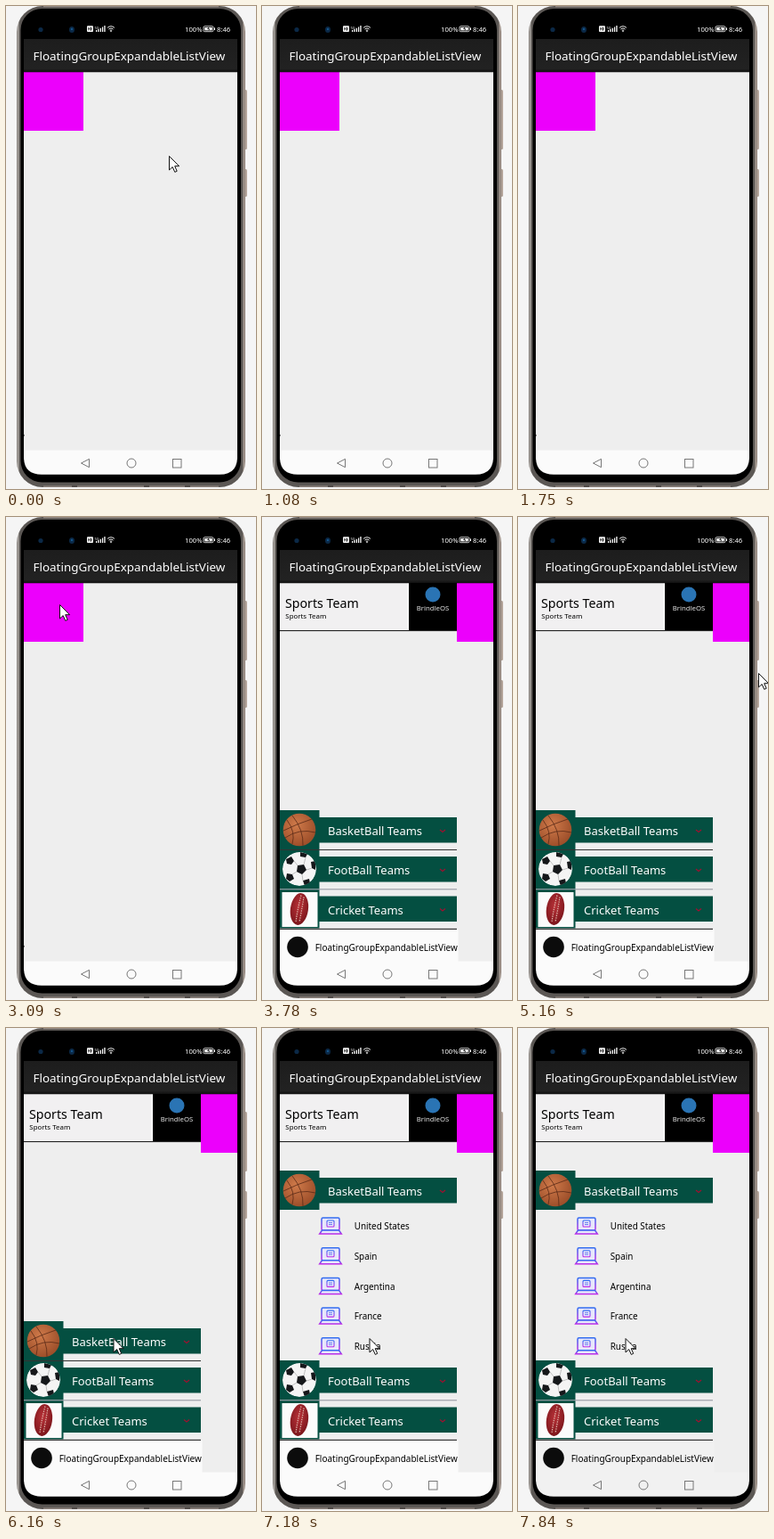
An HTML page that plays this animation: 281 by 542 pixels, repeating every 7990 ms.

```html
<!DOCTYPE html>
<html lang="en">
<head>
<meta charset="utf-8">
<title>Drawer with expandable list</title>
<style>
html, body { margin: 0; width: 100%; height: 100%; overflow: hidden; background: #f5f5f5; }
svg { display: block; width: 281px; height: 542px; font-family: "Noto Sans", "Open Sans", sans-serif; }
</style>
</head>
<body>
<svg viewBox="0 0 281 542">
  <defs>
    <linearGradient id="rim">
      <stop offset="0" stop-color="#7d7874"/><stop offset=".006" stop-color="#aaa5a0"/>
      <stop offset=".014" stop-color="#5b5754"/><stop offset=".986" stop-color="#5b5754"/>
      <stop offset=".994" stop-color="#a89c93"/><stop offset="1" stop-color="#83766e"/>
    </linearGradient>
    <linearGradient id="bar" x2="0" y2="1">
      <stop offset="0" stop-color="#1d1d1d"/><stop offset=".9" stop-color="#222"/><stop offset="1" stop-color="#111"/>
    </linearGradient>
    <linearGradient id="neon" x2="0" y2="1">
      <stop offset="0" stop-color="#2f6cf0"/><stop offset="1" stop-color="#c02be8"/>
    </linearGradient>
    <radialGradient id="orange" cx=".4" cy=".35" r=".7">
      <stop offset="0" stop-color="#cf7a4a"/><stop offset="1" stop-color="#9a4c28"/>
    </radialGradient>
    <radialGradient id="leather" cx=".45" cy=".4" r=".7">
      <stop offset="0" stop-color="#b83238"/><stop offset="1" stop-color="#741218"/>
    </radialGradient>
    <clipPath id="page"><rect x="20" y="74" width="240" height="425"/></clipPath>
    <clipPath id="soccer"><circle r="19"/></clipPath>

    <g id="basketball">
      <circle r="18.3" fill="url(#orange)"/>
      <path d="M-18 1Q-2-7 14-12M-8-16Q5 0 4 18M-16 9Q0-2 18 3M-14-11Q-4 2 -8 16" fill="none" stroke="#5a2a17" stroke-width=".8"/>
    </g>
    <g id="football" clip-path="url(#soccer)">
      <circle r="19" fill="#f4f4f4"/>
      <path d="M-2-4L5-5 8 1 3 6-3 3ZM-15-11L-9-14-6-9-9-5-14-6ZM1-19L9-17 7-13 1-14ZM13-8L18-9V1L14-1ZM-14 5L-8 6-6 11-11 14-15 11ZM4 13L11 11 12 16 6 19Z" fill="#15171a"/>
      <path d="M-2-4L-6-9M5-5L7-13M8 1L14-1M3 6L4 13M-3 3L-8 6" stroke="#aaa" stroke-width=".7"/>
    </g>
    <g id="cricket">
      <rect x="-19.5" y="-18.5" width="40" height="39" fill="#fbfbfb"/>
      <ellipse cy=".5" rx="10" ry="18" fill="url(#leather)" transform="rotate(8)"/>
      <path d="M2-15Q-2 0 -4 15M5-13Q3 0 0 15" fill="none" stroke="#e3c0b4" stroke-width="1.2" stroke-dasharray="1.4 1.2"/>
    </g>
    <g id="laptop" fill="#e8e8fb" stroke="url(#neon)" stroke-width="1.5">
      <rect x="-10" y="-9" width="20" height="14" rx="1.5"/>
      <path d="M-9.5 5H9.5L12.3 9H-12.3Z"/>
      <rect x="-4" y="-6" width="8" height="7" rx="1" stroke-width="1.1"/>
      <path d="M-2-3.5H2M-2-1.5H2" stroke="#4a5ff0" stroke-width=".8"/>
    </g>
  </defs>

  <rect width="281" height="542" fill="#f5f5f5"/>
  <rect x="266" y="94" width="5" height="67" rx="1.5" fill="#b5a69c"/>
  <rect x="266" y="183" width="5" height="31" rx="1.5" fill="#b5a69c"/>
  <rect x="12" y="0" width="257" height="540" rx="29" fill="url(#rim)"/>
  <path d="M42 .6H239M42 539.2H239" stroke="#968b84" stroke-width="1.2"/>
  <path d="M74 539H80M155 539H161M201 539H207" stroke="#514b48" stroke-width="2"/>
  <rect x="16.5" y="3" width="247.5" height="531.5" rx="24" fill="#000"/>

  <g fill="#0b2947">
    <circle cx="39" cy="26.5" r="2.6"/><ellipse cx="74" cy="26.5" rx="3" ry="3.6"/>
    <circle cx="74" cy="26" r="1.2" fill="#14558c"/>
  </g>
  <g fill="#fff">
    <rect x="91" y="22.3" width="7" height="6.6" rx="1"/>
    <path d="M92.6 23.8V27.5M94.2 23.8V27.5M92.6 25.6H94.2M95.5 23.8V27.5Q97.4 25.6 95.5 23.8" fill="none" stroke="#000" stroke-width=".6"/>
    <text x="99.5" y="25.5" font-size="4">5G</text>
    <path d="M101 27H102.2V29H101ZM103.3 26H104.6V29H103.3ZM105.8 24.8H107V29H105.8ZM108 23.4H109.2V29H108ZM110.3 22H111.6V29H110.3Z"/>
    <path d="M114 24.4Q118 21 122 24.4M115.4 26Q118 23.8 120.6 26M116.8 27.5Q118 26.5 119.2 27.5" fill="none" stroke="#fff" stroke-width=".9"/>
    <circle cx="118" cy="28.5" r=".7"/>
    <text x="201" y="28.6" font-size="7.7">100%</text>
    <rect x="222" y="22.7" width="11" height="6" rx="1.3" fill="none" stroke="#fff" stroke-width=".8"/>
    <rect x="223.3" y="24" width="8.4" height="3.4"/>
    <rect x="234" y="24.4" width="1" height="2.6"/>
    <path d="M228 23.5L226 26H228L227.3 28L229.5 25.4H227.7Z" fill="#000"/>
    <text x="237" y="28.6" font-size="7.7">8:46</text>
  </g>

  <rect x="20" y="37" width="240" height="37" fill="url(#bar)"/>
  <text x="30.5" y="61" font-size="13.45" fill="#fff">FloatingGroupExpandableListView</text>
  <rect x="20" y="74" width="240" height="425" fill="#eee"/>
  <path class="pale" d="M20 498.5H260V506Q260 525.7 240 525.7H40Q20 525.7 20 506Z"/>
  <g fill="none" stroke="#777" stroke-width="1">
    <path d="M93.5 508.3V517.7L84.5 513Z"/><circle cx="141" cy="513" r="5"/><rect x="187.5" y="508.5" width="9.5" height="9.5"/>
  </g>

  <g clip-path="url(#page)">
    <g id="slide">
      <rect x="219" y="74" width="67" height="66" fill="#ec00fc"/>
      <rect x="20" y="74" width="199" height="53.5" fill="#f1f0f1"/>
      <rect x="163.5" y="74" width="1.5" height="53" fill="#fff"/>
      <rect x="20" y="127" width="199" height="1.1" fill="#222"/>
      <text x="26" y="101.5" font-size="14.2">Sports Team</text>
      <text x="26.3" y="114" font-size="7.9">Sports Team</text>
      <rect x="165" y="74" width="54" height="53" fill="#000"/>
      <circle cx="192" cy="87" r="8.5" fill="#2a74b4"/>
      <text x="192" y="104.5" font-size="7.8" fill="#e6e6e6" text-anchor="middle">BrindleOS</text>
      <rect class="pale" x="20" y="462" width="200.5" height="37"/>
      <circle cx="40" cy="482.5" r="11.8" fill="#0c0c0c"/>
      <text x="59.7" y="487" font-size="9.97">FloatingGroupExpandableListView</text>
      <g id="rows"></g>
      <g id="kids"></g>
      <rect id="line" x="20" y="373" width="199" height="1" fill="#333"/>
      <rect x="20" y="417.3" width="199" height="1" fill="#8f929c"/>
      <rect x="20" y="461.8" width="199" height="1.1" fill="#222"/>
    </g>
  </g>
  <path d="M20 74.5H260" stroke="#000" stroke-opacity=".25"/>
  <path id="arrow" d="M.5.5V16L4.2 12.6 6.8 18.4 9.2 17.3 6.7 11.7H11.6Z" fill="#fff" stroke="#111" stroke-width="1" stroke-linejoin="round"/>
</svg>
<script>
const LOOP = 7990, OPEN = 199, LIFT = -169;
const $ = id => document.getElementById(id);

const groups = [["BasketBall", "basketball", 351], ["FootBall", "football", 395], ["Cricket", "cricket", 439.5]];
$("rows").innerHTML = groups.map(([name, ball, y]) => `
  <g transform="translate(0 ${y})">
    <rect x="20" y="-22" width="44.5" height="44" fill="#044f41"/>
    <rect x="64" y="-14" width="155" height="28.5" fill="#044f41"/>
    <use href="#${ball}" x="42"/>
    <text x="74" y="6" font-size="13" fill="#fff">${name} Teams</text>
    <path d="M200 0L203 2.5 206 0" fill="none" stroke="#a01030" stroke-width="1.2"/>
  </g>`).join("");

$("kids").innerHTML = ["United States", "Spain", "Argentina", "France", "Russia"].map((name, i) => {
  const y = 222 + i * 33.7;
  return `<use href="#laptop" x="77" y="${y}"/><text x="103.7" y="${y + 4.3}" font-size="9.9">${name}</text>`;
}).join("");

const first = $("rows").firstElementChild;
const pale = document.querySelectorAll(".pale");

// [time, x, y]; no position means the pointer is off stage
const pointer = [
  [0, 183, 168], [150, 112, 134], [270, 46, 111], [390, 58, 106], [540, 44, 104], [660, 58, 103],
  [810, 197, 103], [960, 243, 105], [1080],
  [2430, 172, 111], [2550, 113, 111], [2700, 55, 102], [2820, 60, 99], [2970, 52, 98], [3090, 60, 98],
  [3240, 112, 96], [3360, 180, 94], [3480, 232, 94], [3630, 270, 93], [3780],
  [5160, 270, 175], [5280, 152, 321], [5430, 150, 323],
  [5680, 145, 326], [5800, 137, 333], [5920, 129, 340], [6040, 123, 346], [6160, 120.5, 348]
];
// [time, drawer offset]
const drawer = [[0, 0], [1480, 85], [1600, 30], [1750, 0], [3780, OPEN], [3930, 168], [4080, 179], [4200, OPEN]];

const at = (steps, t) => steps.findLast(s => s[0] <= t);

function draw(now) {
  const t = now % LOOP;
  const [, x, y] = at(pointer, t);
  $("arrow").style.display = x === undefined ? "none" : "";
  if (x !== undefined) $("arrow").setAttribute("transform", `translate(${x} ${y})`);

  $("slide").setAttribute("transform", `translate(${at(drawer, t)[1] - OPEN} 0)`);

  const expanded = t >= 7180;
  first.setAttribute("transform", `translate(0 ${groups[0][2] + (expanded ? LIFT : 0)})`);
  $("kids").style.display = expanded ? "" : "none";
  $("line").style.display = expanded ? "none" : "";
  pale.forEach(el => el.setAttribute("fill", t >= 7330 ? "#f1f1f1" : "#fbfbfb"));
}

const start = performance.now();
function tick() {
  draw(performance.now() - start);
  requestAnimationFrame(tick);
}
tick();
</script>
</body>
</html>
```
